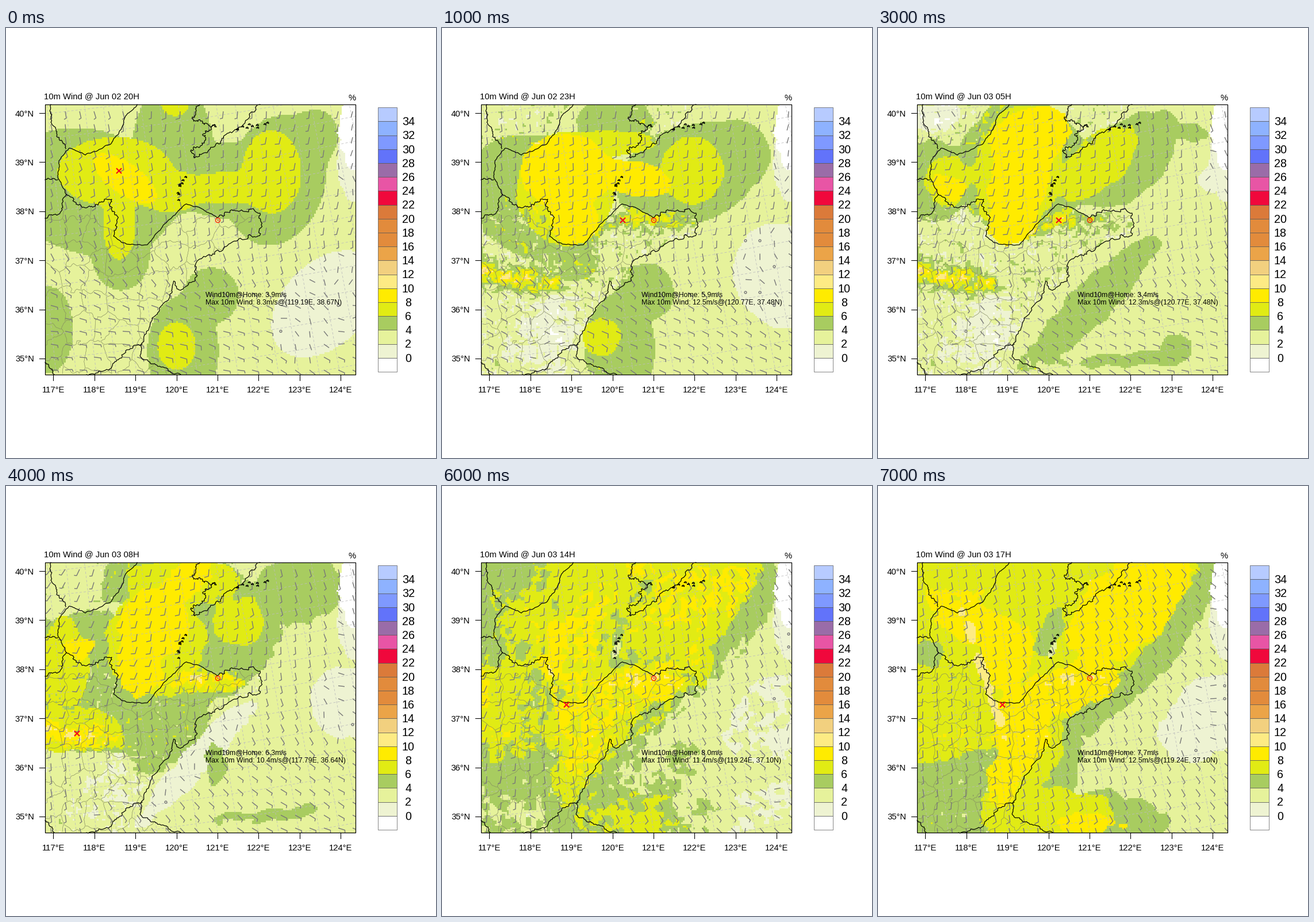
Write a matplotlib script that moves like this. It is 748 px wide and 748 px high and loops after 8000 ms.

```python
import numpy as np
import matplotlib.pyplot as plt
from matplotlib.animation import FuncAnimation
from matplotlib.collections import LineCollection
from matplotlib.colors import ListedColormap
from matplotlib.patches import Polygon, Rectangle
from matplotlib.path import Path

SIZE, DPI = 748, 64
PT = 72 / DPI
L, R, T, B = 68, 608, 133, 603
CELL = 3
NX, NY = (R - L) // CELL, (B - T) // CELL
X, Y = np.meshgrid(L + CELL * (np.arange(NX) + .5), T + (B - T) / NY * (np.arange(NY) + .5))
COLORS = ["#ffffff", "#eef3d2", "#e6f29b", "#a8cc60", "#e1eb14", "#ffeb00", "#fdeb84",
          "#f2d07f", "#eba448", "#e28b3c", "#e28b3c", "#db7a3a", "#f0083c", "#e855a5",
          "#9a6ca8", "#6273fa", "#7f99ff", "#8eb2ff", "#b7cbff"]
plt.rcParams["font.family"] = "Liberation Sans"


def project(lon, lat):
    """Conic projection to stage pixels, anchored at 119.24E 37.10N."""
    def raw(lon, lat):
        th, rho = np.radians(.6 * (lon - 107.2)), 6432 - 85 * (lat - 37.1)
        return rho * np.sin(th), rho * np.cos(th)
    (x, y), (x0, y0) = raw(lon, lat), raw(119.24, 37.1)
    return 216 + x - x0, 380 + y - y0


def noise(seed, size):
    """Smooth value noise in -1..1 with features of the given size in cells."""
    r = np.random.default_rng(seed).uniform(-1, 1, (int(NY / size) + 3, int(NX / size) + 3))
    rows = np.array([np.interp(np.arange(NX) / size, np.arange(r.shape[1]), v) for v in r])
    return np.array([np.interp(np.arange(NY) / size, np.arange(len(r)), v) for v in rows.T]).T


def jagged(flat, amp, seed):
    """Line through key points, broken up by midpoint displacement."""
    rng, p = np.random.default_rng(seed), np.array(flat, float).reshape(-1, 2)
    for _ in range(4):
        d = np.diff(p, axis=0)
        size = np.hypot(*d.T)[:, None]
        push = rng.uniform(-amp, amp, size.shape) * np.minimum(size, 10) / size
        mid = p[:-1] + d / 2 + d[:, ::-1] * [1, -1] * push
        p = np.vstack([np.stack([p[:-1], mid], 1).reshape(-1, 2), p[-1:]])
    return p


# coasts and borders
west = jagged([228, 133, 206, 157, 196, 184, 180, 203, 138, 221, 110, 209, 92, 231, 90, 258, 105, 290], .15, 1)
delta = jagged([105, 290, 130, 308, 160, 308, 184, 298, 192, 325, 187, 362], .42, 2)
bay = jagged([187, 362, 210, 376, 246, 377, 281, 336, 314, 306, 338, 313, 368, 330], .12, 3)
cape = jagged([368, 330, 402, 318, 442, 322, 438, 362, 405, 367, 365, 388, 330, 410, 325, 441], .42, 4)
south = jagged([325, 441, 300, 455, 292, 440, 285, 465, 258, 502, 235, 555, 236, 574, 262, 586, 304, 603], .25, 5)
north = jagged([337, 133, 324, 155, 345, 168, 366, 172, 342, 185, 345, 200, 322, 212, 328, 226, 364, 205,
                395, 180, 442, 133], .42, 6)
borders = [jagged(p, .3, 7) for p in ([78, 133, 80, 168, 93, 195, 104, 210], [68, 264, 90, 264],
                                      [68, 331, 94, 322, 105, 290], [68, 582, 84, 603],
                                      [140, 603, 183, 592, 206, 566, 237, 550])]
shore = np.vstack([delta, bay, cape, south])
land_shape = np.vstack([shore, [[68, 603], [68, 331], [94, 322]]])
cells = np.column_stack([X.ravel(), Y.ravel()])
LAND = np.any([Path(p).contains_points(cells) for p in
               (land_shape, np.vstack([west[:-80], [[68, 205], [68, 133]]]), north)], axis=0).reshape(NY, NX)

WOBBLE = noise(1, 10) + .7 * noise(2, 4)
GRAIN = .8 * noise(3, 2) + .7 * noise(4, 5)
RIDGE = np.exp(-((Y - 422 - .2 * (X - 68)) / 17) ** 2) / (1 + np.exp((X - 205) / 8))
CAPE = np.exp(-((X - 335) / 70) ** 2 - ((Y - 336) / 20) ** 2)
VALLEY = np.exp(-((X - 180) / 55) ** 2 - ((Y - 535) / 70) ** 2)


def ellipse(cx, cy, rx, ry, tilt=0):
    c, s = np.cos(np.radians(tilt)), np.sin(np.radians(tilt))
    u, v = (X - cx) * c + (Y - cy) * s, (Y - cy) * c - (X - cx) * s
    return (np.hypot(u / rx, v / ry) - 1) * min(rx, ry)


def paint(g, level, shapes, wob):
    """Fill the smooth union of ellipses."""
    total = sum(np.exp(-np.clip(ellipse(*e), -200, 200) / 6) for e in shapes)
    g[-6 * np.log(total) + wob * WOBBLE < 0] = level


def field(wob, land, *layers):
    """Sea as layered ellipses; land adds (grain, ridge, cape, valley)."""
    g = np.full((NY, NX), 2)
    for level, *shapes in layers:
        paint(g, level, shapes, wob)
    paint(g, 1, [(606, 230, 30, 72)], 6)
    paint(g, 0, [(609, 185, 29, 68)], 8)
    grain, ridge, tip, valley = land
    rise = grain * GRAIN + (ridge * RIDGE + tip * CAPE) * (1 + .6 * GRAIN) - valley * VALLEY
    return np.where(LAND, np.clip(np.rint(g + rise), 0, 7), g).astype(int)


def between(a, b):
    return np.rint((a + b) / 2 + .3 * noise(9, 3)).astype(int)


evening = field(
    0, (0, 0, 0, 0),
    (3, (145, 285, 150, 108, 15), (200, 395, 50, 62), (290, 210, 70, 115), (375, 265, 80, 65),
     (470, 265, 85, 115, 15), (530, 195, 45, 55, 30)),
    (4, (190, 250, 100, 60), (197, 345, 28, 58), (285, 285, 55, 35), (390, 278, 85, 27),
     (462, 250, 51, 72), (294, 133, 24, 20)),
    (5, (207, 262, 65, 27, 35)),
    (3, (308, 562, 62, 95), (357, 465, 48, 48), (75, 525, 42, 75)),
    (4, (297, 553, 33, 42)),
    (1, (555, 480, 110, 72, -45)))
night = field(
    2, (.75, 2.8, 1.2, 1.2),
    (3, (165, 295, 130, 105, 25), (225, 400, 50, 40), (300, 165, 65, 50), (430, 255, 130, 85, -20),
     (505, 220, 66, 58)),
    (4, (215, 280, 85, 98), (435, 248, 55, 58), (300, 200, 70, 22)),
    (5, (215, 250, 78, 65), (230, 335, 42, 42), (335, 262, 64, 30, 10)),
    (3, (310, 555, 60, 95), (356, 458, 48, 48)),
    (4, (278, 538, 32, 32)),
    (1, (588, 430, 80, 92, -20)))
dawn = field(
    5, (.75, 2.9, 1.2, 1.1),
    (3, (95, 265, 60, 70), (250, 245, 115, 120), (430, 230, 105, 65, -40), (485, 185, 25, 38),
     (550, 185, 22, 18)),
    (4, (245, 245, 75, 115, 12), (120, 265, 38, 42), (380, 235, 88, 42, -42)),
    (5, (265, 190, 75, 50, -20), (245, 275, 50, 75, 12), (230, 348, 40, 28), (125, 276, 32, 20, 20)),
    (3, (375, 475, 155, 34, -45), (430, 575, 75, 10, -5), (515, 558, 28, 25)),
    (1, (105, 155, 45, 25), (580, 265, 24, 22)))
morning = field(
    7, (.55, 1.2, .8, .6),
    (3, (510, 180, 78, 62), (150, 345, 190, 125), (350, 265, 135, 105, -30), (285, 430, 80, 48, -45),
     (280, 165, 130, 55)),
    (4, (310, 165, 100, 45), (260, 270, 85, 95), (405, 235, 42, 40), (100, 310, 45, 85),
     (110, 425, 95, 40), (345, 342, 75, 15)),
    (5, (258, 240, 62, 60), (235, 315, 40, 52), (315, 165, 48, 28, -45), (128, 280, 28, 18)),
    (1, (342, 468, 135, 24, -47), (585, 375, 60, 58, -20)),
    (3, (363, 490, 14, 32), (460, 570, 75, 8, -5)))
noon = field(
    7, (.5, .4, .4, .3),
    (3, (150, 400, 170, 140), (340, 200, 240, 165, -25), (530, 190, 48, 75), (310, 570, 72, 45),
     (400, 490, 55, 38, -40)),
    (4, (320, 165, 135, 65, -5), (265, 280, 85, 95), (455, 195, 95, 50, -15), (445, 310, 22, 50, 15),
     (300, 385, 150, 62, -25), (100, 370, 50, 85), (250, 450, 42, 50)),
    (3, (130, 255, 42, 42), (375, 278, 70, 22, -12), (162, 375, 32, 42), (345, 190, 20, 28, 40)),
    (5, (262, 212, 58, 24, -38), (345, 145, 26, 16), (195, 285, 9, 38), (70, 365, 13, 42),
     (380, 340, 60, 15), (445, 310, 9, 24, 20)),
    (2, (345, 480, 105, 26, -45), (306, 275, 9, 28, 15), (330, 306, 70, 8, -5)),
    (1, (550, 562, 85, 34, -18), (595, 450, 22, 24)))
dusk = field(
    7, (.45, .2, .2, .2),
    (3, (220, 250, 420, 230, -30), (150, 480, 200, 170), (390, 580, 105, 48)),
    (4, (220, 240, 370, 190, -30), (265, 440, 55, 75), (300, 570, 110, 42), (235, 545, 48, 60)),
    (5, (165, 240, 72, 36, 20), (225, 290, 45, 65), (335, 350, 95, 40, -15), (250, 425, 48, 70),
     (215, 520, 22, 38), (435, 210, 125, 70, -40), (365, 588, 45, 16), (130, 188, 58, 9, -8)),
    (6, (186, 335, 92, 7, 72)),
    (3, (302, 255, 52, 18, -65), (85, 290, 30, 20)),
    (2, (306, 280, 20, 6, -75)),
    (1, (565, 405, 85, 62, -50)))
FIELDS = [evening, night, between(night, dawn), dawn, morning, noon, between(noon, dusk), dusk]

# day and hour, wind at home, strongest wind, its lon and lat
INFO = [("02 20", 3.9, 8.3, 119.19, 38.67), ("02 23", 5.9, 12.5, 120.77, 37.48),
        ("03 02", 4.6, 12.4, 120.77, 37.48), ("03 05", 3.4, 12.3, 120.77, 37.48),
        ("03 08", 6.3, 10.4, 117.79, 36.64), ("03 11", 8.1, 10.5, 121.40, 39.42),
        ("03 14", 8.0, 11.4, 119.24, 37.10), ("03 17", 7.7, 12.5, 119.24, 37.10)]

# bearing the wind comes from: in the north, in the south, and its turn towards the east
NORTH_WIND = [178, 182, 185, 185, 185, 188, 172, 158]
SOUTH_WIND = [105, 115, 117, 120, 140, 150, 155, 158]
EAST_TURN = [15, 8, -6, -20, -28, -36, -30, -22]
BX, BY = (v.ravel() for v in np.meshgrid(np.arange(78, R, 25), np.arange(145, B, 22.5)))
COL, ROW = ((BX - L) / CELL).astype(int), ((BY - T) / (B - T) * NY).astype(int)


def barbs(i):
    share = np.clip((BY - 350) / 160, 0, 1)
    ang = NORTH_WIND[i] + share * (SOUTH_WIND[i] - NORTH_WIND[i]) + EAST_TURN[i] * (BX - 338) / 270
    lines = []
    for x, y, t, lv, s in zip(BX, BY, np.radians(ang), FIELDS[i][ROW, COL], noise(100 + i, 14)[ROW, COL]):
        t += s * (1.6 if lv == 1 else .25)
        if lv == 1 and abs(s) < .03:
            c = np.linspace(0, 2 * np.pi, 12)
            lines.append(np.column_stack([x + 2 * np.cos(c), y + 2 * np.sin(c)]))
            continue
        shaft, u = (12 if lv > 1 else 11), t + np.radians(70)
        flag = 0 if lv < 2 else 4.5 if lv < 4 else 7.5
        tail = np.array([x + shaft * np.sin(t), y - shaft * np.cos(t)])
        lines.append(np.array([(x, y), tail, tail + [flag * np.sin(u), -flag * np.cos(u)]]))
    return lines


fig = plt.figure(figsize=(SIZE / DPI, SIZE / DPI), dpi=DPI, facecolor="white")
ax = fig.add_axes([0, 0, 1, 1])
ax.axis("off")


def label(x, y, s, px, ha="left"):
    return ax.text(x, y, s, fontsize=px * PT, ha=ha, va="baseline", zorder=9)


def line(x, y, width, color="black", **kw):
    return ax.plot(x, y, color=color, lw=width * PT, **kw)[0]


image = ax.imshow(FIELDS[0], cmap=ListedColormap(COLORS), vmin=-.5, vmax=18.5, aspect="auto",
                  interpolation="nearest", extent=(L, R, B, T), zorder=1)
frame = Rectangle((L, T), R - L, B - T, fill=False, lw=1.2 * PT, zorder=8)
ax.add_patch(frame)

# county borders: wobbly cells around seeded points, cut to the land
land = ax.add_patch(Polygon(land_shape, fc="none", ec="none"))
rng = np.random.default_rng(6)
seeds = [(x + rng.uniform(-15, 15), y + rng.uniform(-15, 15))
         for y in range(315, 610, 42) for x in range(75, 445, 44)]
dist = np.array([np.hypot(X + 5 * WOBBLE - x, Y + 6 * GRAIN - y) for x, y in seeds])
first, second = np.sort(dist, axis=0)[:2]
for d in dist:
    gap = d - np.where(d == first, second, first)
    if gap.min() < 0 < gap.max():
        ax.contour(X, Y, gap, [0], colors="#858c60", linewidths=.4 * PT, zorder=2).set_clip_path(land)

grid = dict(width=.8, color="#bdbdbd", dashes=(5, 4), zorder=3)
for lon in np.arange(114, 128, .5):
    line(*project(lon, np.linspace(33, 42, 30)), **grid).set_clip_path(frame)
for lat in np.arange(32, 42, .5):
    line(*project(np.linspace(114, 128, 40), lat), **grid).set_clip_path(frame)

wind = ax.add_collection(LineCollection([], colors="#787878", linewidths=1.4 * PT, zorder=4))
wind.set_clip_path(frame)

for path in (west, shore, north, *borders):
    line(*path.T, 1.2, zorder=5)
for (x0, y0), (x1, y1), count in (((312, 257), (299, 297), 8), ((404, 172), (453, 168), 9)):
    for k in np.linspace(0, 1, count):
        x, y = x0 + k * (x1 - x0) + rng.uniform(-4, 4), y0 + k * (y1 - y0) + rng.uniform(-5, 5)
        isle = jagged([x - 2, y, x, y - 2, x + 2, y + 1, x - 2, y], .3, 8)
        line(*isle.T, 1, zorder=5)

for n in range(8):
    x = 82.5 + 71.4 * n
    line([x, x], [B, B + 10], 1.1)
    label(x, 634.5, f"{117 + n}°E", 14.8, "center")
for n in range(6):
    y = 148 + 85.4 * n
    line([L - 10, L], [y, y], 1.1)
    label(49, y + 5.5, f"{40 - n}°N", 14.8, "right")

STEP = 24.2
for n, color in enumerate(reversed(COLORS)):
    ax.add_patch(Rectangle((647.5, 138.2 + STEP * n), 32.5, STEP, fc=color, ec="#555555", lw=.7 * PT))
    if n < 18:
        label(700, 169.2 + STEP * n, str(34 - 2 * n), 19.8, "center")

title = label(66.5, 123.5, "", 14.8)
label(609, 126, "%", 14.8, "right")
home = label(347, 467, "", 12.3)
peak = label(347, 480.5, "", 12.3)
ax.plot(368.5, 334, "o", ms=8 * PT, mfc="none", mec="#ff1a00", mew=1.3 * PT, zorder=7)
ax.plot(368.5, 334, "o", ms=2 * PT, color="#ff1a00", mew=0, zorder=7)
cross = ax.plot([], [], "x", ms=9 * PT, color="#f5001e", mew=2.1 * PT, zorder=7)[0]
ax.set_xlim(0, SIZE)
ax.set_ylim(SIZE, 0)


def update(i):
    hour, here, top, lon, lat = INFO[i]
    image.set_data(FIELDS[i])
    wind.set_segments(barbs(i))
    title.set_text(f"10m Wind @ Jun {hour}H")
    home.set_text(f"Wind10m@Home: {here}m/s")
    peak.set_text(f"Max 10m Wind: {top}m/s@({lon:.2f}E, {lat:.2f}N)")
    x, y = project(lon, lat)
    cross.set_data([x], [y])
    return image, wind, title, home, peak, cross


anim = FuncAnimation(fig, update, frames=8, interval=1000, repeat=True, repeat_delay=0, blit=False)
plt.show()
```
